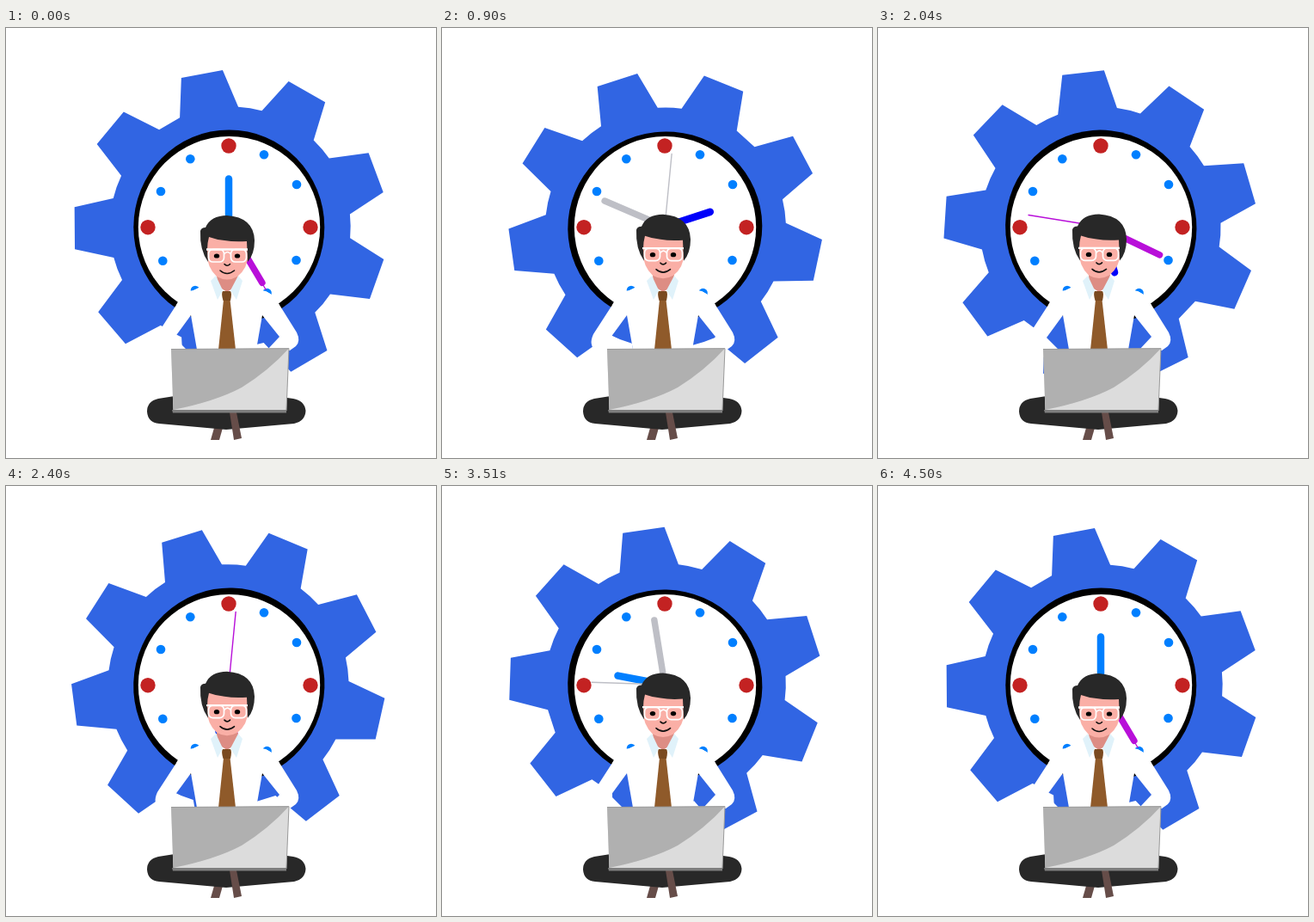
These frames come from a looping animation (500 px wide and 500 px high, 4.53 s). An HTML page:

```html
<!DOCTYPE html>
<html lang="en">
<head>
<meta charset="utf-8">
<title>Clock at work</title>
<style>
  html, body { margin: 0; width: 100%; height: 100%; overflow: hidden; background: #fff; }
  svg { display: block; width: 100vw; height: 100vh; }
</style>
</head>
<body>
<svg viewBox="0 0 500 500">
  <g id="wheel">
    <path id="gear" fill="#3165e3"/>
  </g>
  <ellipse id="ring" cx="259.3" cy="231.6" rx="111" ry="113.2"/>
  <circle cx="259.5" cy="231.6" r="105.7" fill="#fff"/>
  <g id="dots"></g>
  <g stroke-linecap="round">
    <path id="hour" d="M259 231V175.5" stroke-width="8.5"/>
    <path id="minute" d="M259 231V155" stroke-width="7.5"/>
    <path id="second" d="M259 231V146" stroke-width="1.4"/>
  </g>

  <!-- shirt and arms -->
  <g fill="#fff">
    <path d="M240 291L224 302Q219 305 213 306Q204 311 198 322L215 334L222 374H291L298 334L318 322Q311 310 302 306Q295 305 290 301L274 290Z"/>
    <path d="M213 306Q204 311 198 322L176 356Q170 369 179 375L193 383V374H210L196 360L215 334Z"/>
    <path d="M302 306Q311 310 318 322L338 354Q343 364 337 370L330 375H303L318 359L298 334Z"/>
  </g>
  <path d="M245 287H270L268 300L257 307L246 300Z" fill="#dd8d84"/>
  <path d="M244 288L238 294L246 316L252 305ZM270 288L275 294L268 316L261 305Z" fill="#e0f2fa"/>
  <path d="M253 316H260.500L267 374H247Z" fill="#8f5a2a"/>
  <path d="M252 306H261Q263 309 261 317H252.500Q250 309 252 306Z" fill="#7a4a20"/>

  <g id="head">
    <path d="M233 242H282V262Q281 280 269 289Q257 296 245 289Q234 279 233 260Z" fill="#faafa6"/>
    <path d="M235 272Q225 258 226 236Q227 232 232 232Q238 218 257 218Q288 220 289 247Q289 263 281 272L280 248Q265 249 254 247Q244 246 236 243Q234 250 234 258Z" fill="#282828"/>
    <ellipse cx="245" cy="265" rx="3.200" ry="2.600"/>
    <ellipse cx="269" cy="265" rx="3.200" ry="2.600"/>
    <g fill="none" stroke="#fff" stroke-width="1.700">
      <path d="M233 257.500H281" stroke-width="2.400"/>
      <rect x="235.500" y="257.500" width="18" height="14.500" rx="5"/>
      <rect x="261.500" y="257.500" width="18" height="14.500" rx="5"/>
      <path d="M253.500 263Q257.500 258 261.500 263"/>
    </g>
    <g fill="none" stroke="#111" stroke-width="1.600" stroke-linecap="round">
      <path d="M254 274.500Q257 278 260.500 274.500"/>
      <path d="M249 282Q257 289 265.500 282"/>
    </g>
  </g>

  <!-- legs, shoes, laptop -->
  <path d="M242 465H252L248 479H238Z" fill="#664d49"/>
  <path d="M196 428L177 431Q164 434 164 446Q165 459 178 460L256 467L335 460Q348 457 348.500 445Q347 433 334 431L320 429Z" fill="#282828"/>
  <path d="M260 447H268L274 477L265 479Z" fill="#664d49"/>
  <path d="M192 373.500L329 372.500L326 446H194.500Z" fill="#dcdcdc"/>
  <path d="M192 373.500L329 372.500Q306 398 274 418Q244 434 194.500 444Z" fill="#b0b0b0"/>
  <path d="M192 373.500L329 372.700L326 445" fill="none" stroke="#999" stroke-width="1"/>
  <path d="M193 444H326V447.500H194Z" fill="#7e7e7e"/>
</svg>
<script>
const LOOP = 4530, STEP = 30, TURN = 4500;
const $ = id => document.getElementById(id);

// Clockwise from twelve, in degrees.
function polar(cx, cy, r, deg) {
  const a = deg * Math.PI / 180;
  return `${(cx + r * Math.sin(a)).toFixed(2)} ${(cy - r * Math.cos(a)).toFixed(2)}`;
}

function gearPath(cx, cy, teeth, inner, outer, start) {
  let d = '';
  for (let i = 0; i < teeth; i++) {
    const mid = start + i * 360 / teeth;
    d += (i ? `A${inner} ${inner} 0 0 1 ` : 'M') + polar(cx, cy, inner, mid - 14.3);
    d += 'L' + polar(cx, cy, outer, mid - 7.7);
    d += 'L' + polar(cx, cy, outer, mid + 7.7);
    d += 'L' + polar(cx, cy, inner, mid + 14.3);
  }
  return d + 'Z';
}
$('gear').setAttribute('d', gearPath(260.7, 231.4, 9, 140, 182.5, -10.45));

const RED = '#c32222', BLUE = '#007fff';
const dots = [
  [259, 137, RED], [165, 231.7, RED], [354, 231.7, RED],
  [300, 147.3, BLUE], [338, 182, BLUE], [337.500, 270, BLUE], [303.500, 308, BLUE],
  [220, 305, BLUE], [182.300, 270.700, BLUE], [180, 190, BLUE], [214.300, 152.300, BLUE]
];
$('dots').innerHTML = dots.map(([x, y, c]) =>
  `<circle cx="${x}" cy="${y}" r="${c === RED ? 8.7 : 5.3}" fill="${c}"/>`).join('');

// Each row: time, then values.
const sky = [0, 127, 255], navy = [0, 0, 250];
const pink = [184, 15, 217], grey = [190, 191, 198];
const hourInk = [[0, ...sky], [800, ...navy], [2040, ...navy], [2760, ...sky], [TURN, ...sky]];
const longInk = [[0, ...pink], [900, ...grey], [1150, ...grey], [1980, ...pink],
  [2550, ...pink], [3300, ...grey], [3550, ...grey], [TURN, ...pink]];
const bob = [[0, 0], [800, -1.5], [1500, -0.4], [2600, -2.800], [3450, -0.4], [TURN, 0]];

function at(rows, t) {
  let i = 1;
  while (i < rows.length - 1 && t > rows[i][0]) i++;
  const [t0, ...a] = rows[i - 1], [t1, ...b] = rows[i];
  const p = Math.min(1, (t - t0) / (t1 - t0));
  return a.map((v, k) => v + (b[k] - v) * p);
}

function spin(id, deg, cx = 259, cy = 231) {
  $(id).setAttribute('transform', `rotate(${deg.toFixed(3)} ${cx} ${cy})`);
}

function ink(id, rgb) {
  $(id).setAttribute('stroke', `rgb(${rgb.map(Math.round)})`);
}

function draw(t) {
  const turn = 360 * t / TURN;
  const wheel = Math.min(360, 360 * t / 4475);
  spin('wheel', wheel, 259.6, 231.4);
  spin('ring', wheel, 259.3, 231.6);
  spin('hour', turn);
  spin('minute', 149.2 + 2 * turn);
  spin('second', 149.5 + 3 * turn);
  ink('hour', at(hourInk, t));
  const long = at(longInk, t);
  ink('minute', long);
  ink('second', long);
  $('head').setAttribute('transform', `translate(0 ${at(bob, t)[0].toFixed(2)})`);
}

const begin = performance.now();
function tick() {
  const t = (performance.now() - begin) % LOOP;
  draw(Math.floor(t / STEP) * STEP);
  requestAnimationFrame(tick);
}
draw(0);
requestAnimationFrame(tick);
</script>
</body>
</html>
```
